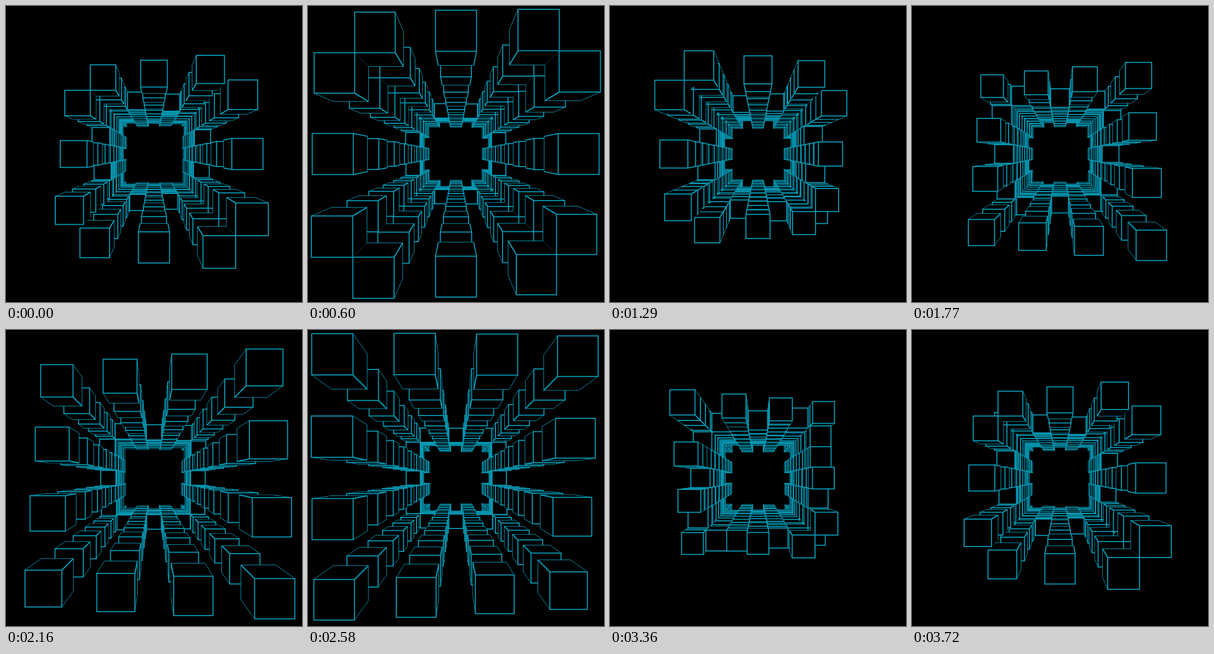
Animation of 540 by 540 pixels, one loop 3.75 s. Source, as an HTML page with a canvas:

```html
<!DOCTYPE html>
<html lang="en">
<head>
<meta charset="utf-8">
<title>Cube tunnel</title>
<style>
  html, body { margin: 0; width: 100%; height: 100%; overflow: hidden; background: #000; }
  canvas { display: block; }
</style>
</head>
<body>
<canvas id="stage" width="540" height="540"></canvas>
<script>
const ctx = document.getElementById('stage').getContext('2d');
const CENTER = 270;
const FOCAL = 467.65;
const LOOP = 3750;
const STEP = 30;
const LAYERS = 10;
const PEAK = 589;      // ms at which the first ring is closest
const LAG = 26.8;      // ms of delay per unit of distance
const REST_Z = 18.1;   // depth at which a stack is folded together
const REACH = 5.95;    // half of the front layer's travel
const SLAB = 0.5;      // depth of the slices painted from far to near
const FAR = 27, NEAR = 6;
const THICK = 1.9, THIN = 1, FAINT = 0.3;

// Two interleaved rings of columns, half a loop apart.
const columns = [];
function addRing(steps, peak) {
  const sites = new Map();
  for (const s of steps) {
    for (const [x, y] of [[s, -3], [s, 3], [-3, s], [3, s]]) sites.set(x + ',' + y, { x, y, peak });
  }
  columns.push(...sites.values());
}
addRing([-2, 0, 2], PEAK);
addRing([-3, -1, 1, 3], PEAK + LOOP / 2);
for (const column of columns) column.walls = wallsOf(column);
// Inner columns hide outer ones.
columns.sort((a, b) => Math.hypot(b.x, b.y) - Math.hypot(a.x, a.y));

// Each wall is a cube side that faces the tunnel axis: two corners and their edge widths.
function wallsOf({ x, y }) {
  const ix = x - Math.sign(x) / 2, iy = y - Math.sign(y) / 2;
  const ox = x + Math.sign(x) / 2, oy = y + Math.sign(y) / 2;
  if (!x) return [{ a: [-0.5, iy], b: [0.5, iy], edge: THICK }];
  if (!y) return [{ a: [ix, -0.5], b: [ix, 0.5], edge: THICK }];
  return [[ix, oy], [ox, iy]].map(b => {
    const shared = Math.abs(b[0]) === Math.abs(b[1]);
    return { a: [ix, iy], b, edge: shared ? FAINT : THIN };
  });
}

function depth(column, layer, t) {
  const delay = column.peak - LAG * (column.x + column.y) + 2 * LAG * layer;
  const swing = 1 + Math.cos(2 * Math.PI * (t - delay) / LOOP);
  return REST_Z - (REACH - layer) * swing;
}

function project([x, y], z) {
  const s = FOCAL / z;
  return [CENTER + x * s, CENTER + y * s];
}

function fill(points) {
  ctx.beginPath();
  for (const p of points) ctx.lineTo(...p);
  ctx.fill();
}

function line(from, to, width) {
  ctx.lineWidth = width;
  ctx.beginPath();
  ctx.moveTo(...from);
  ctx.lineTo(...to);
  ctx.stroke();
}

function drawRung(walls, z, width) {
  for (const { a, b } of walls) line(project(a, z), project(b, z), width);
}

function drawFront({ x, y }, z) {
  const [left, top] = project([x - 0.5, y - 0.5], z);
  const size = FOCAL / z;
  ctx.fillRect(left, top, size, size);
  ctx.lineWidth = THICK;
  ctx.strokeRect(left, top, size, size);
}

// Paints the part of one column that lies between two depths.
function drawSlice(column, stack, near, far) {
  const { walls } = column;
  const inside = z => z >= near && z < far;
  const present = stack.filter(z => z < far && z + 1 > near);

  for (const z of present) {
    const z0 = Math.max(z, near), z1 = Math.min(z + 1, far);
    for (const { a, b } of walls) {
      fill([project(a, z0), project(b, z0), project(b, z1), project(a, z1)]);
    }
  }
  for (const z of present) {
    const z0 = Math.max(z, near), z1 = Math.min(z + 1, far);
    for (const { a, b, edge } of walls) {
      line(project(a, z0), project(a, z1), THICK);
      line(project(b, z0), project(b, z1), edge);
    }
    if (inside(z + 1)) drawRung(walls, z + 1, THIN);
  }
  for (const z of present.filter(inside)) {
    const embedded = stack.some(other => other < z && z < other + 1);
    if (embedded) drawRung(walls, z, THICK);
    else drawFront(column, z);
  }
}

function draw(t) {
  ctx.fillStyle = '#000';
  ctx.strokeStyle = '#0699b4';
  ctx.fillRect(0, 0, 540, 540);
  const stacks = columns.map(column =>
    Array.from({ length: LAYERS }, (_, k) => depth(column, k, t)).sort((p, q) => q - p));
  for (let near = FAR - SLAB; near >= NEAR; near -= SLAB) {
    columns.forEach((column, i) => drawSlice(column, stacks[i], near, near + SLAB));
  }
}

let start = null;
function tick(now) {
  if (start === null) start = now;
  const t = (now - start) % LOOP;
  draw(Math.floor(t / STEP) * STEP);
  requestAnimationFrame(tick);
}
draw(0);
requestAnimationFrame(tick);
</script>
</body>
</html>
```
